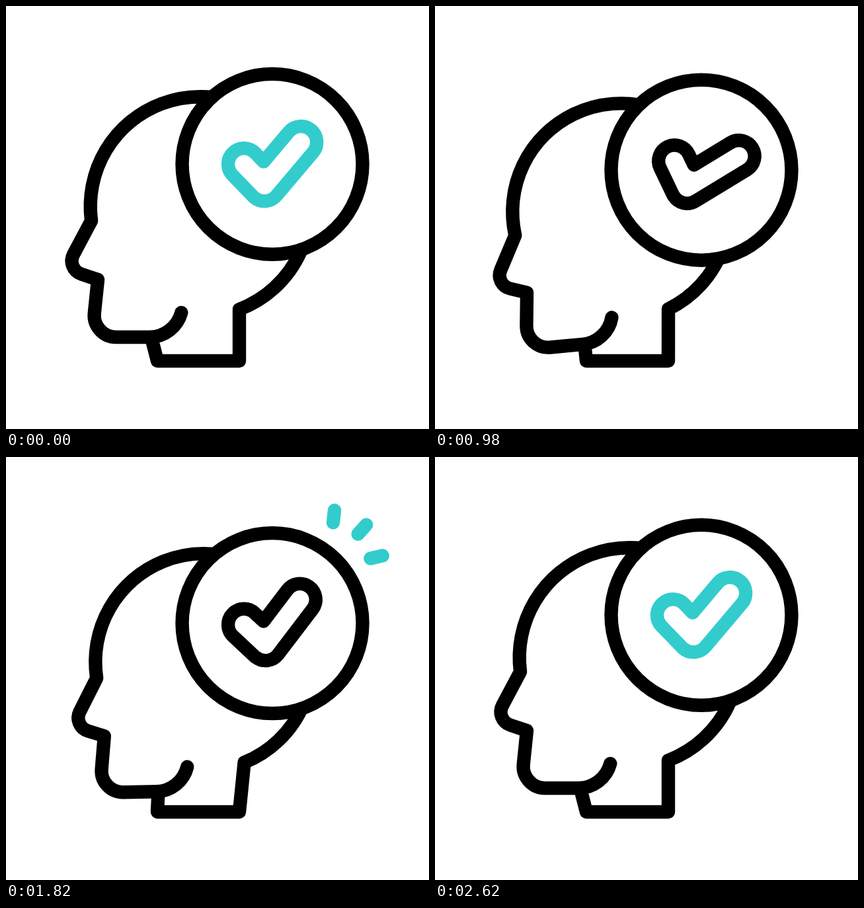
Recreate the animation shown at these times as an HTML page with a canvas. Size 640 by 640 pixels, loop 3000 ms.

```html
<!DOCTYPE html>
<html lang="en">
<head>
<meta charset="utf-8">
<title>Thinking head with tick</title>
<style>
  html, body { margin: 0; width: 100%; height: 100%; overflow: hidden; background: #fff; }
  canvas { display: block; width: 100vmin; height: 100vmin; }
</style>
</head>
<body>
<canvas id="stage" width="640" height="640"></canvas>
<script>
const ctx = document.getElementById('stage').getContext('2d');
const LOOP = 3000;
const TEAL = '#33cccc';
const BLACK = '#000';
const RAD = Math.PI / 180;
const SKULL = { x: 294, y: 303.5, r: 166.3 };

const clamp = u => Math.min(1, Math.max(0, u));
const ease = u => u * u * (3 - 2 * u);
const ramp = (t, from, to) => clamp((t - from) / (to - from));

// Eases from each key time to the next; every key is [time, ...values].
function swing(t, keys) {
  let i = 0;
  while (i < keys.length - 2 && t > keys[i + 1][0]) i++;
  const [t0, ...a] = keys[i], [t1, ...b] = keys[i + 1];
  const u = ease(ramp(t, t0, t1));
  return a.map((v, k) => v + (b[k] - v) * u);
}

const headPose = (time, deg, x, y) =>
  [time, Math.cos(deg * RAD), Math.sin(deg * RAD), x, y];

// The head nods down, tips up, nods again and comes to rest.
const HEAD = [
  headPose(200, 0, SKULL.x, SKULL.y),
  headPose(812, -10.5, 262.5, 309.2),
  headPose(1360, 13, 345, 318.2),
  headPose(2100, -7.8, 277.8, 306.2),
  headPose(2620, 0, SKULL.x, SKULL.y)
];
const DISC_Y = [[200, 239.3], [770, 266], [1310, 213.4], [2075, 264.8], [2620, 239.3]];
const TICK_ANGLE = [[200, 0], [885, 20.8], [1520, -16], [2150, 12], [2620, 0]];
const ARM = [[720, 85.5], [1530, 110], [2100, 63.5], [2620, 85.5]];

// The tick turns black twice, for 360 ms each time.
const isBlack = t => t >= 800 && t < 1840 && (t - 800) % 680 < 360;

function drawHead(t) {
  const [cos, sin, x, y] = swing(t, HEAD);
  const enter = () => {
    ctx.setTransform(cos, sin, -sin, cos, x, y);
    ctx.translate(-SKULL.x, -SKULL.y);
  };
  const leave = () => ctx.setTransform(1, 0, 0, 1, 0, 0);
  const angleTo = (px, py) => Math.atan2(py - SKULL.y, px - SKULL.x);

  ctx.beginPath();
  enter();
  ctx.moveTo(220, 502);
  leave();
  ctx.lineTo(229, 537);
  ctx.lineTo(353, 537);
  enter();
  ctx.arc(SKULL.x, SKULL.y, SKULL.r, angleTo(353, 459), angleTo(129, 325), true);
  ctx.arcTo(90.4, 397.8, 139, 414, 21);
  ctx.lineTo(139, 414);
  ctx.arcTo(130, 501, 217, 501, 33);
  ctx.lineTo(217, 501);
  ctx.arc(217, 451, 50, 90 * RAD, 15 * RAD, true);
  leave();
  ctx.strokeStyle = BLACK;
  ctx.stroke();
}

function drawDisc() {
  ctx.beginPath();
  ctx.arc(0, 0, 136.5, 0, Math.PI * 2);
  ctx.fillStyle = '#fff';
  ctx.fill();
  ctx.strokeStyle = BLACK;
  ctx.stroke();
}

// Rounded outline around a short arm and a long arm that meet at the corner.
function drawTick(t) {
  const r = 24, half = Math.PI / 2;
  const left = { x: -43, y: 0 }, corner = { x: -12, y: 32 };
  const down = 45.9 * RAD, up = -49.8 * RAD;
  const [arm] = swing(t, ARM);
  const mid = (down + up - Math.PI) / 2;
  const reach = r / Math.sin((up + Math.PI - down) / 2);

  ctx.beginPath();
  ctx.arc(left.x, left.y, r, down + half, down + 3 * half);
  ctx.lineTo(corner.x + reach * Math.cos(mid), corner.y + reach * Math.sin(mid));
  ctx.arc(corner.x + arm * Math.cos(up), corner.y + arm * Math.sin(up), r, up - half, up + half);
  ctx.arc(corner.x, corner.y, r, up + half, down + half);
  ctx.closePath();
  ctx.strokeStyle = isBlack(t) ? BLACK : TEAL;
  ctx.stroke();
}

// Three dashes fanned out at the upper right of the disc.
function drawSparks(t) {
  if (t < 1320 || t >= 1950) return;
  const tail = 22 * ramp(t, 1800, 1950);
  const tip = Math.max(22 * ramp(t, 1340, 1500), tail + 0.01);
  ctx.strokeStyle = TEAL;
  for (let i = -1; i <= 1; i++) {
    ctx.save();
    ctx.rotate((-43.2 + 12.3 * i) * RAD);
    ctx.translate(184 - 9 * Math.abs(i), 0);
    ctx.rotate((-2.1 + 23.2 * i) * RAD);
    ctx.beginPath();
    ctx.moveTo(tail, 0);
    ctx.lineTo(tip, 0);
    ctx.stroke();
    ctx.restore();
  }
}

function draw(t) {
  ctx.setTransform(1, 0, 0, 1, 0, 0);
  ctx.fillStyle = '#fff';
  ctx.fillRect(0, 0, 640, 640);
  ctx.lineWidth = 20.4;
  ctx.lineCap = ctx.lineJoin = 'round';

  drawHead(t);
  ctx.translate(403, swing(t, DISC_Y)[0]);
  drawDisc();
  ctx.rotate(swing(t, TICK_ANGLE)[0] * RAD);
  drawTick(t);
  drawSparks(t);
}

const start = performance.now();
function loop() {
  draw((performance.now() - start) % LOOP);
  requestAnimationFrame(loop);
}
loop();
</script>
</body>
</html>
```
